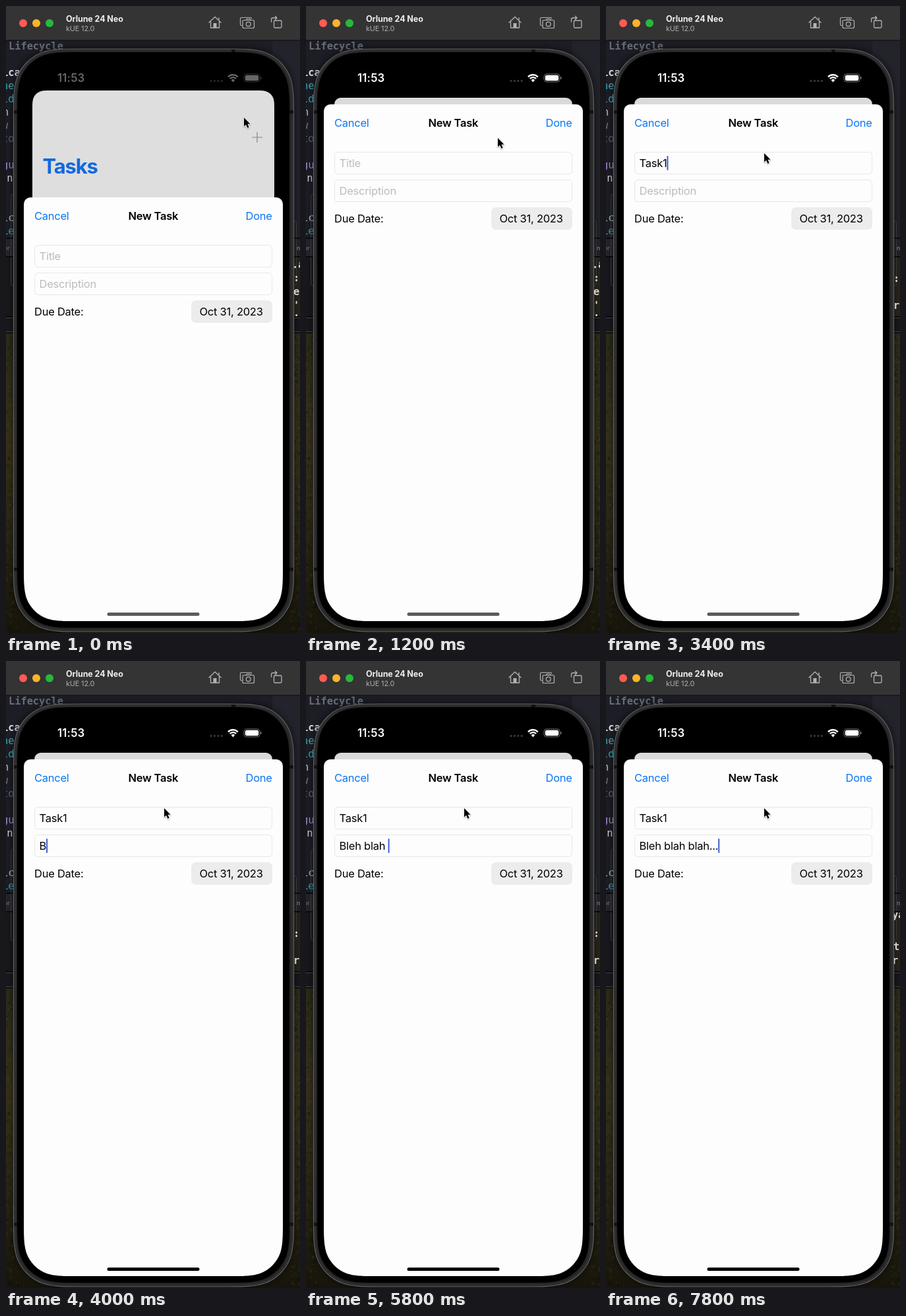
Animation of 446 by 950 pixels, one loop 8000 ms. Source, as an HTML page with a canvas:

```html
<!DOCTYPE html>
<html lang="en">
<head>
<meta charset="utf-8">
<title>New Task sheet</title>
<style>
html, body { margin: 0; width: 100%; height: 100%; overflow: hidden; background: #000; }
canvas { display: block; width: 446px; height: 950px; }
</style>
</head>
<body>
<canvas id="stage" width="446" height="950"></canvas>
<script>
const W = 446, H = 950, LOOP = 8000, STEP = 200;
const SANS = 'Inter, Roboto, sans-serif';
const MONO = '"DejaVu Sans Mono", "Noto Sans Mono", monospace';
const BLUE = '#0a78f5';
const stage = document.getElementById('stage');
let g = stage.getContext('2d');

function paint(path, fill, stroke, lw) {
  if (fill) { g.fillStyle = fill; g.fill(path); }
  if (stroke) { g.strokeStyle = stroke; g.lineWidth = lw; g.stroke(path); }
}

function box(x, y, w, h, r, fill, stroke, lw = 1) {
  const path = new Path2D();
  path.roundRect(x, y, w, h, r);
  paint(path, fill, stroke, lw);
}

// Rectangle with continuous corners, whose curve eases into the sides.
function smoothRect(x, y, w, h, r) {
  const path = new Path2D();
  const corners = [
    [x, y, 0, 1, 1, 0], [x + w, y, -1, 0, 0, 1],
    [x + w, y + h, 0, -1, -1, 0], [x, y + h, 1, 0, 0, -1]
  ];
  for (const [cx, cy, ax, ay, bx, by] of corners) {
    const p = (u, v) => [cx + r * (ax * u + bx * v), cy + r * (ay * u + by * v)];
    path.lineTo(...p(1.5287, 0));
    path.bezierCurveTo(...p(1.0885, 0), ...p(0.8684, 0), ...p(0.6315, 0.0749));
    path.bezierCurveTo(...p(0.3728, 0.1691), ...p(0.1691, 0.3728), ...p(0.0749, 0.6315));
    path.bezierCurveTo(...p(0, 0.8684), ...p(0, 1.0885), ...p(0, 1.5287));
  }
  path.closePath();
  return path;
}

function dot(x, y, r, fill) {
  g.beginPath();
  g.arc(x, y, r, 0, Math.PI * 2);
  g.fillStyle = fill;
  g.fill();
}

function text(str, x, y, { size = 16.5, weight = 400, color = '#000', track = -0.25, font = SANS } = {}) {
  g.font = `${weight} ${size}px ${font}`;
  g.letterSpacing = track + 'px';
  g.textBaseline = 'alphabetic';
  g.fillStyle = color;
  g.fillText(str, x, y);
  return g.measureText(str).width;
}

function line(path, color, lw) {
  g.lineCap = g.lineJoin = 'round';
  paint(new Path2D(path), null, color, lw);
}

function code(str, x, y, color, weight = 400) {
  text(str, x, y, { size: 15.3, weight, color, track: 0, font: MONO });
}

function seeded(seed) {
  return () => (seed = (seed * 16807) % 2147483647) / 2147483647;
}

function drawGrass() {
  const shade = g.createLinearGradient(0, 496, 0, H);
  shade.addColorStop(0, '#2b2b18');
  shade.addColorStop(0.35, '#35311a');
  shade.addColorStop(0.65, '#2a2715');
  shade.addColorStop(1, '#17150b');
  g.fillStyle = shade;
  g.fillRect(0, 496, W, H - 496);
  const rnd = seeded(41);
  for (let i = 0; i < 700; i++) {
    const x = rnd() < 0.5 ? rnd() * 18 : W - rnd() * 14;
    g.fillStyle = rnd() < 0.5 ? 'rgba(12,12,4,0.2)' : 'rgba(98,92,50,0.14)';
    g.fillRect(x, 498 + rnd() * 450, 1 + rnd() * 3, 1 + rnd() * 4);
  }
}

function drawEditor() {
  g.fillStyle = '#1c1d25';
  g.fillRect(0, 52, W, 444);
  g.fillStyle = '#22232b';
  g.fillRect(404, 52, 42, 300);
  code('Lifecycle', 4, 66, '#686c75', 700);
  const rows = [
    ['ica', -6, 106, '#d8d9dc', 700], ['ne', -6, 126, '#43a9b8'], ['ld', -6, 146, '#43a9b8'],
    ['n', -5, 166, '#c7c8cc'], ['w', -6, 186, '#7a7d86'], ['to', -6, 206, '#5f636d'],
    ['gu', -6, 246, '#a98bd0'], ['nn', -8, 266, '#d8d9dc'], ['ic', -6, 326, '#a9bfc4'],
    ['Le', -6, 346, '#3f9aa8']
  ];
  for (const r of rows) code(...r);
  g.fillStyle = '#17181c';
  g.fillRect(0, 352, W, 144);
  g.fillStyle = '#24252b';
  g.fillRect(0, 353, W, 26);
  text('or', -3, 370, { size: 9, color: '#777', track: 0 });
  text('n', 441, 370, { size: 9, color: '#999', track: 0 });
  g.fillStyle = '#29251a';
  g.fillRect(437, 381, 9, 90);
  box(7.5, 285.5, 10, 138, 3, null, '#44454a');
  box(430, 325.5, 10.5, 98, 3, null, '#44454a');
  g.fillStyle = '#060607';
  for (const y of [351, 379, 470, 495]) g.fillRect(0, y, W, 1.5);
  g.fillStyle = '#46474a';
  g.fillRect(0, 472, W, 1);
  g.fillRect(0, 493, W, 1);
}

function drawTitleBar() {
  box(0, 0, W, 52, 0, '#343434');
  g.fillStyle = '#0c0c0c';
  g.fillRect(0, 51.5, W, 1);
  ['#ff5c54', '#fdb32b', '#27b93a'].forEach((c, i) => dot(26 + 20 * i, 26, 6, c));
  text('Orlune 24 Neo', 91, 24, { size: 12.5, weight: 700, color: '#efefef', track: -0.1 });
  text('kUE 12.0', 91, 38, { size: 10.8, color: '#b0b0b0', track: -0.1 });
  const c = '#b2b2b2';
  line('M308 25 L317 16.5 L326 25 M310.5 23.5 V33 H323.5 V23.5 M323 18 V20.5', c, 1.3);
  box(314.5, 26, 5, 7, 0, c);
  line('M358 29.5 H357 Q355.5 29.5 355.5 28 V19 Q355.5 17.5 357 17.5 H371 Q372.5 17.5 372.5 19', c, 1.2);
  box(359, 21.5, 17.5, 12, 2, '#343434', c, 1.2);
  line('M364 21.5 L365.5 19.5 H370 L371.5 21.5', c, 1.2);
  g.beginPath();
  g.arc(367.7, 27.5, 3.4, 0, 7);
  g.stroke();
  box(406.5, 22, 11.5, 11, 1.5, null, c, 1.3);
  line('M402.5 24 V20.5 Q402.5 18 405 18 H411 M408.5 15.5 L411 18 L408.5 20.5', c, 1.3);
}

function drawPhone() {
  g.shadowColor = 'rgba(0,0,0,0.6)';
  g.shadowBlur = 12;
  paint(smoothRect(11, 64.5, 426, 884, 70), '#1d1d1e');
  g.shadowBlur = 0;
  paint(smoothRect(11.5, 65, 425, 883, 69.5), '#242425', '#626263', 1.2);
  paint(smoothRect(14, 67.5, 420, 878, 67), null, '#303031', 2);
  g.fillStyle = '#111';
  g.fillRect(342, 66, 6, 5);
  for (const y of [158, 851]) {
    g.fillRect(12, y, 6, 5);
    g.fillRect(430, y, 6, 5);
  }
  paint(smoothRect(17, 70, 413, 872, 64), '#000');
}

function makeBackdrop() {
  const layer = document.createElement('canvas');
  layer.width = W;
  layer.height = H;
  const main = g;
  g = layer.getContext('2d');
  drawEditor();
  drawGrass();
  drawPhone();
  drawTitleBar();
  g = main;
  return layer;
}

// Code in the window behind the phone's right edge.
function drawSideCode(t) {
  const rows = t < 1600 ? [['.a', 397], [':', 417], ['e', 438], ["'", 459], ['.', 470]]
    : t < 6600 ? [[':', 418], ['r', 459]]
    : [['ya', 390], ['t', 438], ['r:', 459]];
  g.save();
  g.beginPath();
  g.rect(437, 380, 9, 91);
  g.clip();
  for (const [s, y] of rows) code(s, s.length > 1 ? 434 : 436, y, '#d6d4cd', 700);
  g.restore();
}

function drawStatus(t) {
  const ink = t < 200 ? '#666' : '#fff';
  const rim = t < 200 ? '#333' : '#707070';
  text('11:53', 78, 115, { size: 16.8, weight: 600, color: ink, track: 0.2 });
  for (let i = 0; i < 4; i++) dot(311 + 5.4 * i, 113.5, 1.7, t < 200 ? '#252525' : '#353535');
  g.strokeStyle = ink;
  g.lineCap = 'butt';
  g.lineWidth = 2.4;
  for (const r of [10.2, 6.4]) {
    g.beginPath();
    g.arc(344.4, 114.5, r, -Math.PI * 0.76, -Math.PI * 0.24);
    g.stroke();
  }
  g.beginPath();
  g.moveTo(344.4, 115.5);
  g.arc(344.4, 114.5, 3.6, -Math.PI * 0.78, -Math.PI * 0.22);
  g.fillStyle = ink;
  g.fill();
  box(361, 103, 24, 12, 4, null, rim);
  box(362.8, 104.8, 20.4, 8.4, 2.6, ink);
  box(386, 107, 1.5, 4, 1, rim);
}

function drawBackCard(rest) {
  const inset = 43 - 3 * rest, top = 139 - 11 * rest;
  paint(smoothRect(inset, top, 447 - 2 * inset, 500, 10 + 9 * rest), rest > 0.5 ? '#dedede' : '#dadada');
  text('Tasks', 55.5, top + 125.5, { size: 31, weight: 700, color: '#1268e0', track: -1.2 });
  line(`M373.5 ${top + 71} h15 M381 ${top + 63.5} v15`, '#7d8894', 1.2);
}

function typed(t, runs) {
  return runs.map(([s, start, gap]) =>
    s.slice(0, Math.max(0, Math.floor((t - start) / gap) + 1))).join('');
}

function caretAlpha(t) {
  const phase = t % 1200;
  return phase < 200 ? 0.25 : phase < 400 ? 0 : 1;
}

function drawField(y, hint, value, focused, t) {
  box(43.5, y + 0.5, 360, 33, 5, '#fdfdfd', '#e7e7e8');
  const w = text(value || hint, 50.5, y + 23, { color: value ? '#000' : '#bcbcbe' });
  if (!focused) return;
  g.globalAlpha = caretAlpha(t);
  box(50.5 + (value ? w : 0), y + 6, 2, 22, 1, '#3c61d5');
  g.globalAlpha = 1;
}

function drawSheet(t, rest) {
  const y = Math.round(149 + 141 * rest);
  box(27, y, 393, 932 - y, [10, 10, 0, 0], '#fdfdfd');
  text('Cancel', 43, y + 34, { color: BLUE });
  text('New Task', 185.5, y + 34, { weight: 600 });
  text('Done', 363.5, y + 34, { color: BLUE });
  const title = typed(t, [['Task1', 2400, 200]]);
  const note = typed(t, [['Bleh', 4000, 200], [' blah ', 5000, 160], ['blah...', 6200, 200]]);
  drawField(y + 72, 'Title', title, t >= 1800 && t < 3800, t);
  drawField(y + 114, 'Description', note, t >= 3800, t);
  text('Due Date:', 43, y + 179);
  box(281, y + 156, 123, 34, 7, '#ececed');
  text('Oct 31, 2023', 293.5, y + 179);
  box(153.5, 919, 140, 5, 2.5, t < 3600 ? '#5b5b5c' : '#000');
}

const track = [
  [0, 361, 169], [200, 314, 193], [400, 300, 198], [600, 291, 200],
  [1200, 291, 200], [1400, 264, 212], [1600, 240, 223]
];

function pointerAt(t) {
  const i = track.findIndex(k => k[0] > t);
  if (i < 0) return track.at(-1).slice(1);
  const [t0, x0, y0] = track[i - 1], [t1, x1, y1] = track[i];
  const p = (t - t0) / (t1 - t0);
  return [x0 + (x1 - x0) * p, y0 + (y1 - y0) * p];
}

function drawPointer(t) {
  const [x, y] = pointerAt(t);
  g.save();
  g.translate(x, y);
  g.shadowColor = 'rgba(0,0,0,0.35)';
  g.shadowBlur = 2;
  g.shadowOffsetY = 1;
  const arrow = new Path2D('M0 0 V13.5 L3.1 10.7 L5.3 15.8 L7.6 14.8 L5.5 9.8 H9.5 Z');
  g.lineJoin = 'round';
  paint(arrow, null, '#fff', 1.6);
  g.shadowColor = 'transparent';
  paint(arrow, '#000');
  g.restore();
}

const backdrop = makeBackdrop();
const screenShape = smoothRect(27, 80, 393, 852, 55);

function draw(t) {
  const rest = Math.exp(-t / 70);
  g.drawImage(backdrop, 0, 0);
  drawSideCode(t);
  g.save();
  g.clip(screenShape);
  drawStatus(t);
  drawBackCard(rest);
  drawSheet(t, rest);
  g.restore();
  drawPointer(t);
}

const start = performance.now();
function tick() {
  const t = (performance.now() - start) % LOOP;
  draw(Math.floor(t / STEP) * STEP);
  requestAnimationFrame(tick);
}
tick();
</script>
</body>
</html>
```
